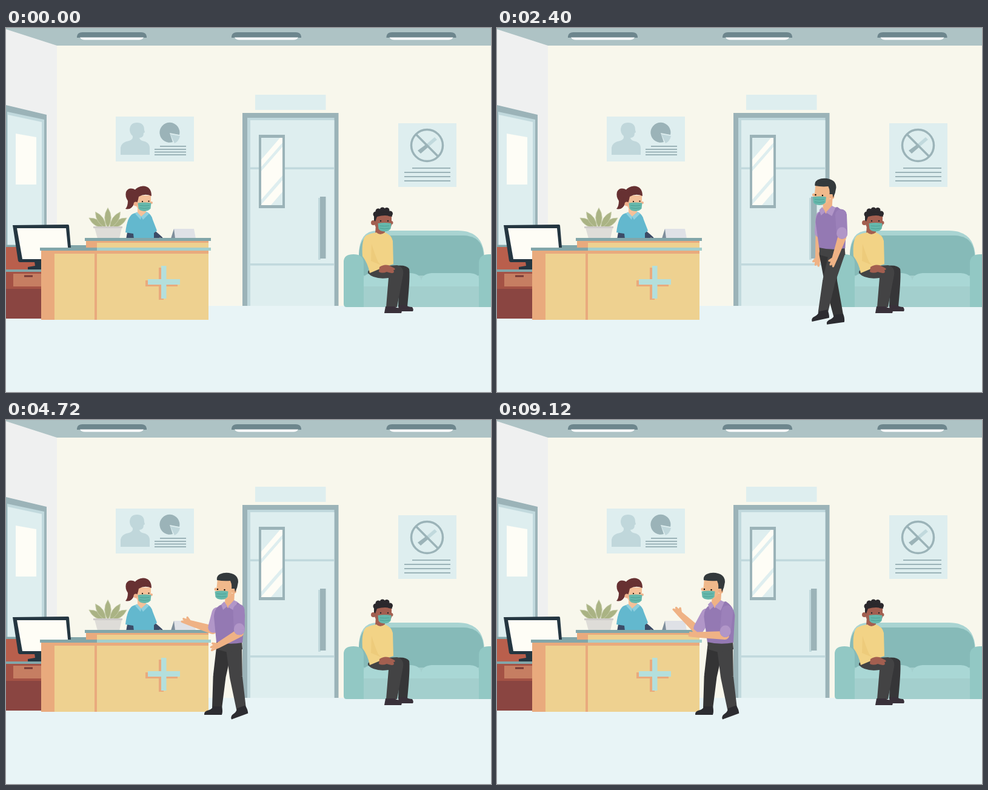
An HTML page for the animation above (9360 ms loop, 800 px wide and 600 px high).

```html
<!DOCTYPE html>
<html lang="en">
<head>
<meta charset="utf-8">
<title>Clinic reception</title>
<style>
  html, body { margin: 0; width: 100%; height: 100%; overflow: hidden; background: #f8f7ec; }
  svg { display: block; width: 100vw; height: 100vh; }
  .steel { fill: #9bb3b8 } .trim { fill: #c1d9dd } .pane { fill: #deeeef } .glass { fill: #fefdf6 }
  .wood { fill: #eed190 } .edge { fill: #e9aa7d } .top { fill: #82a6a9 } .mint { fill: #a3cfcd }
  .mask { fill: #66b8ac } .pleat { fill: none; stroke: #469a8f; stroke-width: .8 }
  .skin { fill: #efb285 } .fair { fill: #f5c199 } .brown { fill: #a35f50 } .navy { fill: #3c4c67 }
  .purple { fill: #9479b3 } .sleeve { fill: #9c81ba } .lilac { fill: #b196c8 }
  .farLeg { fill: #343435 } .nearLeg { fill: #434344 } .shoe { fill: #2c2c31 }
  .lines { fill: none; stroke: #9bb3b8; stroke-width: 2 }
</style>
</head>
<body>
<svg viewBox="0 0 800 600">
  <defs>
    <g id="lamp">
      <path fill="#6d868d" d="M0 16V14Q1 7 9 7H106Q114 7 115 14V16Z"/>
      <path fill="#fff" d="M5 15.500H110Q108 19.500 102 19.500H13Q7 19.500 5 15.500Z"/>
    </g>
    <g id="mask">
      <path class="mask" d="M-11 -6Q0 -8 11 -6L10 3Q7 7 0 7.500Q-8 7 -10 3Z"/>
      <path class="pleat" d="M-8 -2Q0 -1 8 -2M-8 2Q0 4 8 2"/>
    </g>
    <path id="leaf" d="M0 0Q-10 -17 0 -32Q10 -17 0 0Z"/>
    <path id="shoe" class="shoe" d="M-6 -3H8Q10 5 8 11H-21Q-22 5 -13 3Q-8 1 -6 -3Z"/>
  </defs>

  <!-- room -->
  <path fill="#f8f7ec" d="M0 0H800V600H0Z"/>
  <path fill="#eff0f0" d="M0 0L84 29V460H0Z"/>
  <path fill="#aec3c5" d="M0 2V0H800V29H84Z"/>
  <path fill="#e8f4f6" d="M0 458H800V600H0Z"/>
  <use href="#lamp" x="117"/><use href="#lamp" x="372"/><use href="#lamp" x="627.500"/>
  <path class="steel" d="M0 127L67 143V460H0Z"/>
  <path class="trim" d="M2 138L63 151V460H2Z"/>
  <path class="pane" d="M3 143L59 155V460H3Z"/>
  <path class="glass" d="M16 174L50 180V258H16Z"/>

  <!-- posters -->
  <path class="pane" d="M181 146H310V220H181ZM647 157H743V262H647ZM411 110H527.500V135H411Z"/>
  <g fill="#c0d7db">
    <path d="M189 209V198Q190 188 203 186Q210 184 209 178Q204 174 204 167Q205 156 216 156Q228 156 228 168L229 172L227 173Q227 181 220 181Q221 185 225 186Q237 188 237 198V209Z"/>
    <path d="M271 175L287 178Q285 187 278 190Z"/>
  </g>
  <path class="steel" d="M270 173L275 188A16.500 16.500 0 1 1 286 176Z"/>
  <path class="lines" d="M254 195H297M245 200H297M245 204.500H297M245 209H297"/>
  <path fill="#9bb3b8" d="M679 202L694 191L698 195L684 207Z"/>
  <path fill="#c1d9dd" d="M694 191L707 180L711 184L698 195Z"/>
  <g fill="none" stroke="#9bb3b8" stroke-width="3.500">
    <circle cx="694.500" cy="193.500" r="26"/><path d="M676 175L713 212"/>
  </g>
  <path class="lines" d="M670 231H733M657 238H733M657 245H733M657 252H733"/>

  <!-- door -->
  <path class="steel" d="M390 140H548.500V458H390Z"/>
  <path class="trim" d="M398 148H541.500V458H398Z"/>
  <path class="pane" d="M403 152H541.500V458H403Z"/>
  <path class="trim" d="M403 229.500H541V233H403ZM403 388H541V391.500H403ZM515 280H519V382H515Z"/>
  <path class="steel" d="M417 176H460V297H417ZM518 278H527.500V380H518Z"/>
  <path class="pane" d="M421 181H456V292H421Z"/>
  <path class="glass" d="M421 217L452 181H456V189L421 229ZM421 236L456 196V243L421 283ZM421 291L456 251V270L437 292H421Z"/>

  <!-- sofa -->
  <path fill="#a9d4d2" d="M582 410V375Q582 334 612 334H745Q788 334 789 378V410Z"/>
  <path fill="#86bab8" d="M582 410V375Q583 343 603 342H755Q788 343 788 378V410Z"/>
  <path class="mint" d="M589 408H781V460H589Z"/>
  <path fill="#a9d7d5" d="M590 426V412Q592 404 608 404H668Q683 405 685 416Q687 405 702 404H765Q780 405 780 414V426Z"/>
  <path fill="#92c8c4" d="M557 455V384Q558 373 573 373Q589 373 590 386V460H562Q557 460 557 455ZM780 460V386Q781 373 797 373H800V460Z"/>

  <!-- waiting visitor -->
  <path fill="#363638" d="M626 395Q659 387 665 397Q667 408 662 459H647L649 410Z"/>
  <path class="nearLeg" d="M597 401Q604 392 645 391Q657 394 655 407L645 460H627L631 412Q607 415 597 404Z"/>
  <path fill="#39313a" d="M647 457H660Q664 460 670 460Q673 464 671 467H648ZM626 459H640Q645 462 651 462Q654 466 652 470H624Z"/>
  <path class="brown" d="M610 325H625V339Q617 346 609 339Z"/>
  <path fill="#f2d386" d="M611 337Q617 343 625 337Q636 341 638 351L639 389Q620 395 600 404Q597 388 588 376Q586 349 594 342Q602 338 611 337Z"/>
  <path fill="#e5c06c" d="M603 356Q609 375 614 386L619 391L602 384Z" opacity=".4"/>
  <path class="brown" d="M616 394Q623 389 631 391L641 396Q643 399 639 399Q642 404 636 404Q631 403 628 402Q621 405 615 402Z"/>
  <path class="brown" d="M607 311Q606 306 619 305L636 307V325Q634 334 623 335Q609 333 608 322Z"/>
  <circle class="brown" cx="606" cy="321" r="4"/><circle class="brown" cx="635.500" cy="321" r="3"/>
  <g fill="#2b282c">
    <path d="M607 317V306Q611 298 624 299Q636 301 637 311Q626 307 612 311L609 319Z"/>
    <circle cx="610" cy="307" r="4.500"/><circle cx="614" cy="302" r="4.500"/><circle cx="621" cy="300" r="4.500"/>
    <circle cx="628" cy="300.500" r="4.500"/><circle cx="633.500" cy="306" r="4.500"/>
    <circle cx="618" cy="318" r="1.200"/><circle cx="630" cy="318" r="1.200"/>
  </g>
  <use href="#mask" x="624.500" y="328"/>

  <!-- computer and cabinet -->
  <path fill="#b95f4c" d="M0 360H62V400H0Z"/>
  <path class="top" d="M0 357.500H18V361H0ZM0 398H62V402H0ZM104 358H133V362H104Z"/>
  <path fill="#a45245" d="M0 402H60V430H0Z"/>
  <path fill="#c67e62" d="M12 405H60V426H12Z"/>
  <path fill="#743936" d="M30 407.500H44V410.500H30Z"/>
  <path fill="#8a4541" d="M0 430H60V479H0Z"/>
  <path fill="#243641" d="M11 325L102 324Q104 324 104 326L109 386H23Q21 386 20 384ZM47 385H60V398H36V394L48 392Z"/>
  <path class="glass" d="M18 330H99L104 381H27Z"/>

  <!-- plant -->
  <g fill="#aab384" stroke="#c9cfae" stroke-width=".8">
    <use href="#leaf" transform="translate(164 330) rotate(-58)"/>
    <use href="#leaf" transform="translate(172 330) rotate(58)"/>
    <use href="#leaf" transform="translate(165 330) rotate(-33)"/>
    <use href="#leaf" transform="translate(171 330) rotate(33)"/>
    <use href="#leaf" transform="translate(168 330) scale(1.050)"/>
  </g>
  <path fill="#dedcd8" d="M146 329H191L187 347H151Z"/>
  <path fill="#cfccca" d="M144 327H192V330H144Z"/>

  <!-- receptionist -->
  <path class="fair" d="M217 296H231V311H217Z"/>
  <path class="navy" d="M200 337H211V348H198Z"/>
  <path id="deskSleeve" class="navy"/><path id="deskHand" class="fair"/>
  <path fill="#63b8ce" d="M216 304L223 311L232 303Q240 307 242 316L249 334L244 338V348H211L210 339L197 337Q200 310 210 306Z"/>
  <path fill="#8fd0df" d="M216 303L223 311L222 316L213 306ZM232 303L236 306L226 316L223 311Z"/>
  <g id="deskHead">
    <path fill="#673132" d="M214 267Q203 261 198 270Q196 278 201 285Q201 294 197 298Q207 301 212 288Z"/>
    <path class="fair" d="M212 276H239V290Q237 302 226 302Q214 299 213 286Z"/>
    <path fill="#673132" d="M209 286Q207 262 226 260.500Q240 261 240 277Q229 272 219 278Q217 288 214 293Z"/>
    <circle fill="#efb18c" cx="214" cy="290" r="3.500"/><circle fill="#efb18c" cx="240" cy="288" r="2"/>
    <circle cx="225" cy="286" r="1.100"/><circle cx="235.500" cy="285.500" r="1.100"/>
    <use href="#mask" x="228.500" y="294.500"/>
  </g>

  <!-- counter -->
  <path fill="#dfe1e6" d="M277 331H310L313 347H272Z"/><path fill="#7e8e9b" d="M277 331L279 347H272Z"/>
  <path class="wood" d="M150 351H334V481H80V366H150Z"/>
  <path class="edge" d="M132 351H334V354H150V363H132ZM58 367H80V481H58ZM80 367H334V372H80ZM146 367H150V481H146Z"/>
  <path class="top" d="M130 346H338V351H130ZM56 362H150V367H56Z"/>
  <path class="mint" d="M150 362H338V367H150Z"/>
  <path class="edge" d="M252 395H260V448H252ZM230 416H283V426H230Z"/>
  <path fill="#b4dfdc" d="M256 392H264.500V446H256ZM234 414H287V423H234Z"/>

  <!-- arriving man -->
  <g id="man">
    <path id="farForearm" class="skin"/><path id="farSleeve" class="lilac"/>
    <path id="farLeg" class="farLeg"/><use id="farShoe" href="#shoe"/>
    <path id="nearLeg" class="nearLeg"/><use id="nearShoe" href="#shoe"/>
    <path class="nearLeg" d="M-21 -6H21L22 8L-2 13L-20 8Z"/>
    <g id="torso">
      <path class="purple" d="M-25 -46Q-24 -62 -12 -66L12 -71Q24 -64 26 -48L22 -3Q0 1 -21 -4Z"/>
    </g>
    <g id="head">
      <path class="skin" d="M-6 -84H9L8 -68L-2 -60L-7 -68Z"/>
      <path class="lilac" d="M-8 -71L-3 -63L-10 -57L-13 -66ZM8 -73L14 -70L8 -56L-2 -62Z"/>
      <path fill="#f0b98b" d="M-19 -109H6V-91Q4 -76 -9 -74Q-20 -76 -21 -88Z"/>
      <circle class="skin" cx="8" cy="-88" r="4"/><circle class="skin" cx="-22" cy="-91" r="2.500"/>
      <path fill="#343a3c" d="M-20 -106Q-21 -113 -15 -116Q-6 -120 4 -117Q15 -114 15 -103Q14 -94 10 -86L9 -92L4 -92Q5 -99 2 -105Q-9 -104 -20 -106Z"/>
      <circle cx="-19" cy="-91" r="1.200"/><circle cx="-7.500" cy="-90" r="1.200"/>
      <use href="#mask" x="-12.500" y="-81.500"/>
    </g>
    <path id="nearForearm" class="skin"/><path id="nearSleeve" class="sleeve"/><path id="nearCuff" class="lilac"/>
  </g>
</svg>
<script>
const LOOP = 9360, STEP = 40, STRIDE = 548, SPEED = 0.1327;
const CONTACT = 1640, ARRIVE = 3790;
const FRONT = -20, BACK = 20, THIGH = 47, SHIN = 52;
const $ = id => document.getElementById(id);
const lerp = (a, b, k) => a + (b - a) * k;
const mix = (p, q, k) => p.map((v, i) => lerp(v, q[i], k));
const wave = turns => Math.sin(turns * 2 * Math.PI);
const ease = (t, from, to) => {
  const k = Math.min(1, Math.max(0, (t - from) / (to - from)));
  return k * k * (3 - 2 * k);
};
const draw = (id, d) => $(id).setAttribute('d', d);
const move = (id, value) => $(id).setAttribute('transform', value);

// Tapered limb through joints given as [x, y], with a radius for each.
function limb(joints, radii) {
  return joints.map(([x, y], i) => {
    const r = radii[i];
    let d = `M${x - r} ${y}a${r} ${r} 0 1 0 ${2 * r} 0a${r} ${r} 0 1 0 ${-2 * r} 0Z`;
    if (i + 1 < joints.length) {
      const [u, v] = joints[i + 1], s = radii[i + 1], len = Math.hypot(u - x, v - y) || 1;
      const nx = (v - y) / len, ny = (x - u) / len;
      d += `M${x - nx * r} ${y - ny * r}L${u - nx * s} ${v - ny * s}` +
           `L${u + nx * s} ${v + ny * s}L${x + nx * r} ${y + ny * r}Z`;
    }
    return d;
  }).join('');
}

// Palm with two fingers and a thumb that continue the forearm.
function hand([ex, ey], [x, y], size = 1) {
  const angle = Math.atan2(y - ey, x - ex);
  const tip = (turn, reach) =>
    [x + Math.cos(angle + turn) * reach * size, y + Math.sin(angle + turn) * reach * size];
  return [tip(-.15, 12), tip(.3, 11), tip(.95, 9)]
    .map(end => limb([[x, y], end], [4.5 * size, 1.7 * size])).join('');
}

function leg(side, hip, phase, ground) {
  const stance = phase <= .5, k = stance ? phase * 2 : phase * 2 - 1;
  const x = stance ? lerp(FRONT, BACK, k) : lerp(BACK, FRONT, ease(k, 0, 1));
  const arc = stance ? 0 : Math.sin(Math.PI * k);
  const tilt = (stance ? -20 * ease(phase, .3, .5) : -20 * (1 - k)) - 12 * arc;
  const ankle = [x, ground - 11 * arc];
  const dx = x - hip[0], dy = ankle[1] - hip[1];
  const reach = Math.min(Math.hypot(dx, dy), THIGH + SHIN - .1);
  const bend = Math.acos((THIGH ** 2 + reach ** 2 - SHIN ** 2) / (2 * THIGH * reach));
  const angle = Math.atan2(dy, dx) + bend;
  const knee = [hip[0] + THIGH * Math.cos(angle), hip[1] + THIGH * Math.sin(angle)];
  draw(side + 'Leg', limb([hip, knee, ankle], [13, 10.5, 8]));
  move(side + 'Shoe', `translate(${ankle}) rotate(${tilt})`);
}

function arm(side, [sx, sy, ex, ey, hx, hy]) {
  const shoulder = [sx, sy], elbow = [ex, ey], palm = [hx, hy];
  const cuff = mix(shoulder, elbow, .85);
  draw(side + 'Forearm', limb([elbow, palm], [7, 4.5]) + hand(elbow, palm));
  draw(side + 'Sleeve', limb([shoulder, cuff], [9.5, 9]));
  if (side === 'near') draw('nearCuff', limb([mix(shoulder, elbow, .8), cuff], [8.5, 9]));
}

function poseMan(t) {
  const steps = Math.min(4, (t - CONTACT) / STRIDE);
  const phase = (steps % 1 + 1) % 1;
  const reach = ease(t, 3880, 4480), settle = ease(t, 4760, 5640);
  const stop = ease(t, 3650, 3900);
  const hipX = 368 + Math.max(0, SPEED * (ARRIVE - t));
  const hipY = 368 - 3 * Math.abs(wave(phase)) + 2 * stop;
  const swing = wave(phase + .05) * (1 - stop);
  move('man', `translate(${hipX} ${hipY})`);

  const ground = 475 - hipY;
  leg('far', [-8, 6], phase, ground);
  leg('near', [8, 6], (phase + .5) % 1, ground + 1);

  const lean = lerp(lerp(-8, 0, stop), -7, settle);
  const skew = Math.atan(-lean / 97) * 180 / Math.PI;
  move('torso', `skewX(${skew * .5})`);
  move('head', `translate(${lean} 0)`);

  const blend = (walk, point, rest) => mix(mix(walk, point, reach), rest, settle);
  arm('far', blend([-17, -55, -20, -25, -25 + 5 * swing, 14],
                   [-19, -52, -27, -24, -66, -36],
                   [-22, -50, -37, -23, -67, -51]));
  arm('near', blend([15, -58, 17, -22, 8 - 10 * swing, 15],
                    [16, -57, 17, -19, -19, 2],
                    [12, -55, 8, -15, -39, -16]));
}

function poseReceptionist(t) {
  const talk = ease(t, 6320, 6920) - ease(t, 8040, 8640);
  const tilt = ease(t, 5000, 5800) - ease(t, 8200, 8800);
  const elbow = mix([241, 338], [245, 343], talk), wrist = mix([254, 348], [266, 335], talk);
  const palm = mix([258, 358], [274, 329], talk);
  draw('deskSleeve', limb([elbow, wrist], [6, 5]));
  draw('deskHand', limb([wrist, palm], [2.5, 3]) + hand(wrist, palm, .9));
  move('deskHead', `translate(${-1.5 * tilt} 0) rotate(${-1.5 * tilt} 224 302)`);
}

function frame(now) {
  const t = Math.floor(now % LOOP / STEP) * STEP;
  poseMan(t);
  poseReceptionist(t);
  requestAnimationFrame(frame);
}
frame(performance.now());
</script>
</body>
</html>
```
